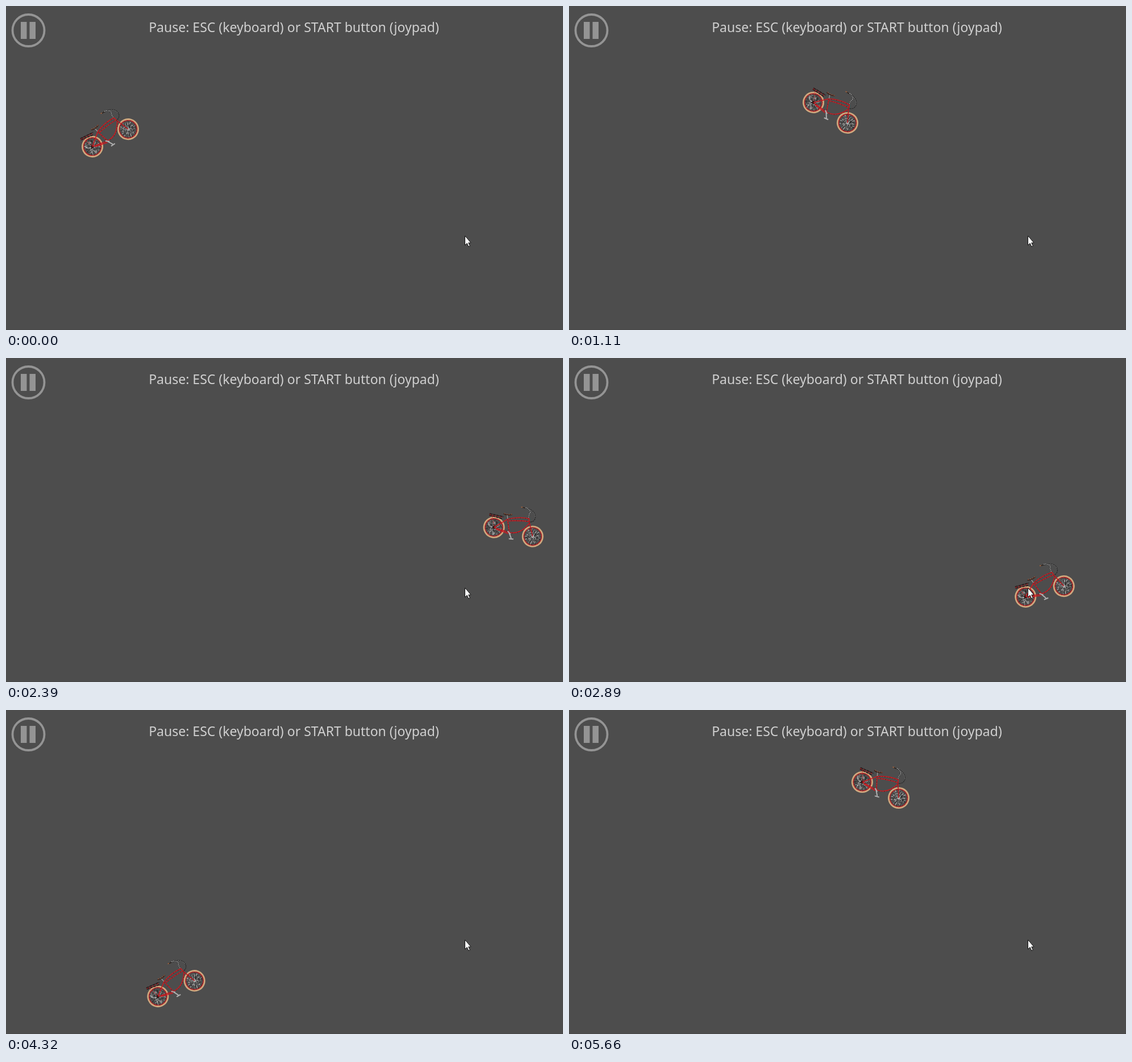
An HTML page that plays this animation: 980x571 px, repeating every 5.76 s.

```html
<!DOCTYPE html>
<html lang="en">
<head>
<meta charset="utf-8">
<title>Bicycle</title>
<style>
html, body { margin: 0; width: 100%; height: 100%; overflow: hidden; background: #4d4d4d; }
svg { display: block; width: 100vw; height: 100vh; }
text { font: 23px "Noto Sans", "Open Sans", sans-serif; fill: #d0d0d0; text-anchor: middle; }
#bike path { fill: none; stroke-linejoin: round; }
</style>
</head>
<body>
<svg viewBox="0 0 980 571">
  <rect y="570" width="980" height="1" fill="#474747"/>
  <g fill="#949494">
    <circle cx="39.5" cy="43" r="28" fill="none" stroke="#949494" stroke-width="3.8"/>
    <path d="M26 28h10.500v30H26zM41.500 28H52v30H41.500z"/>
  </g>
  <text x="506.5" y="46">Pause: ESC (keyboard) or START button (joypad)</text>

  <g id="bike">
    <g id="wheels"></g>
    <!-- rack and saddle -->
    <path d="M-48-22H-23M-48-19.500L-24-18" stroke="#2a1a1a" stroke-width="1.800" stroke-dasharray="5 1"/>
    <path d="M-48-20.500H-24M-43-19L-35-2" stroke="#b81c20" stroke-dasharray="3 2"/>
    <path d="M-24-27.500Q-18-25-9-29.500" stroke="#3a2620" stroke-width="2"/>
    <path d="M-23-28.500Q-17-27-9-30" stroke="#b0603c" stroke-dasharray="2 2"/>
    <path d="M-17-26L-14.500-19" stroke="#a0a0a0" stroke-width="1.200"/>
    <!-- frame -->
    <path d="M-35 0L-6.500 2.600L-15-19.500L-35 0M-15-19.500Q3-29 21-29M-13-17Q8-23 23-24M-7 2.600Q14 2 24-22M21-30L24-22L35 0M-31 2L-8 5" stroke="#cc1a20" stroke-width="1.600"/>
    <path d="M-35 0L-7 2L-15-19M-15-19Q3-28 21-28.500M-13-17Q8-23 23-24M-6 3Q14 3 24-21L35 0" stroke="#5a2024" stroke-dasharray="1 3 2 3"/>
    <!-- handlebar and cable -->
    <path d="M3.500-46L10-45.500" stroke="#a8643c" stroke-width="1.500"/>
    <path d="M6-45.500L16-46Q22-45 20-38L20.500-30" stroke="#222" stroke-width="1.600"/>
    <path d="M11-46.500L16-46Q23-43 20-37L20.500-30" stroke="#b4b4b4" stroke-width="1.200" stroke-dasharray="2 1"/>
    <path d="M16-46Q31-44 32-33Q32-25 23-23" stroke="#222" stroke-dasharray="3 1"/>
    <path d="M17-45.500Q30-43 31.500-33" stroke="#989898" stroke-width=".9" stroke-dasharray="1 2"/>
    <!-- crank -->
    <path d="M-10 1L-4 5M-7 3L-1 12M-5 13.500L3 12.500" stroke="#b0b0b0" stroke-width="2"/>
  </g>

  <path d="M807.500 405v16.500l3.700-3.300 2.600 5.900 2.500-1.100-2.600-5.700h4.300z" fill="#fff" stroke="#111"/>
</svg>
<script>
const LOOP = 5760, STEP = 54;

// the ride: step, x and y midway between the hubs, tilt in degrees
const ride = [
  [0, 183.5, 232.5, -26], [6, 201, 290, -14], [12, 268, 292, 0], [20, 460, 188, 31],
  [27, 627, 113, 42], [34, 797.5, 125, 41], [45, 893, 322, 10], [53, 837, 411.5, -15.6],
  [60, 648, 386, -34], [67, 478, 401, -39], [80, 299.5, 491, -23.3], [86, 308, 455, -7],
  [92, 386, 344, 13.2], [101, 540, 170, 22.3], [104, 548, 141, 23.6]
];
const last = ride.length - 1;

const secant = (i, c) => (ride[i + 1][c] - ride[i][c]) / (ride[i + 1][0] - ride[i][0]);

// slope at a key: the nearer neighbour counts for more
function slope(i, c) {
  if (i === 0) return secant(0, c);
  if (i === last) return secant(last - 1, c);
  const before = ride[i][0] - ride[i - 1][0], after = ride[i + 1][0] - ride[i][0];
  return (secant(i - 1, c) * after + secant(i, c) * before) / (before + after);
}

// cubic Hermite curve through the keys
function pose(step) {
  let i = 0;
  while (i < last - 1 && ride[i + 1][0] <= step) i++;
  const p = ride[i], q = ride[i + 1], d = q[0] - p[0], u = (step - p[0]) / d, v = 1 - u;
  return [1, 2, 3].map(c =>
    v * v * (1 + 2 * u) * p[c] + u * u * (3 - 2 * u) * q[c] +
    d * u * v * (v * slope(i, c) - u * slope(i + 1, c)));
}

let seed = 7;
const rand = () => (seed = seed * 16807 % 2147483647) / 2147483647;

function wheel(cx, hub) {
  const ring = (r, color, width, dash = "none") =>
    `<circle cx="${cx}" r="${r}" fill="none" stroke="${color}" stroke-width="${width}" stroke-dasharray="${dash}"/>`;
  let art = ring(17.6, "#cfa87e", 2.8) + ring(15.5, "#c41f24", 1.4) + ring(15, "#5a2426", 0.8, "2 3");
  // broken spokes
  for (const color of ["#c8c8c8", "#929292", "#222"]) {
    let d = "";
    for (let i = 0; i < 42; i++) {
      const a = rand() * 2 * Math.PI, r = 2 + rand() * 10, e = r + 1.5 + rand() * 2;
      const at = k => (cx + k * Math.cos(a)).toFixed(1) + " " + (k * Math.sin(a)).toFixed(1);
      d += `M${at(r)}L${at(e)}`;
    }
    art += `<path d="${d}" stroke="${color}" stroke-width=".9"/>`;
  }
  return art + `<circle cx="${cx}" r="2.5" fill="${hub}"/>`;
}

document.getElementById("wheels").innerHTML = wheel(-35, "#2a1414") + wheel(35, "#b0b0b0");
const bike = document.getElementById("bike");
const start = performance.now();

function draw() {
  const now = (performance.now() - start) % LOOP;
  const [x, y, tilt] = pose(Math.min(Math.floor(now / STEP), ride[last][0]));
  bike.setAttribute("transform", `translate(${x} ${y}) rotate(${tilt})`);
  requestAnimationFrame(draw);
}
draw();
</script>
</body>
</html>
```
